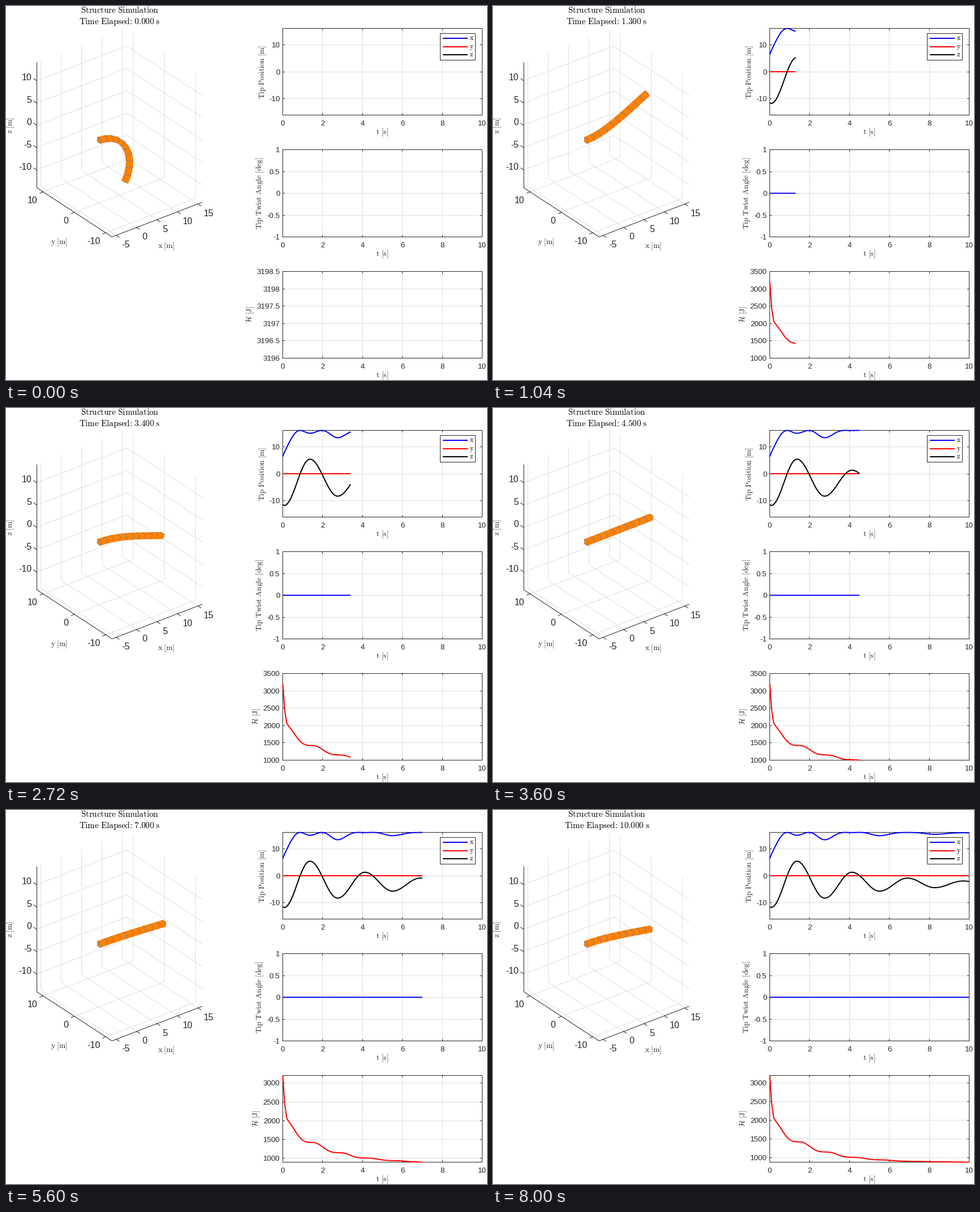
These frames come from a looping animation (849 by 660 pixels, 8.08 s). A matplotlib script:

```python
import numpy as np
import matplotlib.pyplot as plt
from matplotlib.animation import FuncAnimation
from matplotlib.collections import LineCollection, PolyCollection
from matplotlib.patches import Rectangle

plt.rcParams["font.family"] = "Liberation Sans"
plt.rcParams["mathtext.fontset"] = "cm"
plt.rcParams["path.snap"] = False

W, H, DPI = 849, 660, 96
FRAMES, STEP_MS = 101, 80
PX = 72 / DPI
INK, GRID = "#262626", "#dfdfdf"
LEFT, RIGHT = 488.5, 840.5
TIMES = np.arange(FRAMES) / 10

fig = plt.figure(figsize=(W / DPI, H / DPI), dpi=DPI, facecolor="white")
ax = fig.add_axes([0, 0, 1, 1])
ax.set_xlim(0, W)
ax.set_ylim(H, 0)
ax.axis("off")


# ---------- drawing helpers ----------
def crisp(v):
    """Centre of the pixel that holds v."""
    return np.floor(v + 1e-6) + 0.5


def segments(segs, color, z):
    col = LineCollection(segs, colors=color, linewidths=PX, zorder=z,
                         capstyle="projecting")
    ax.add_collection(col)
    return col


def curve(color, z):
    return ax.plot([], [], color=color, lw=2 * PX, zorder=z,
                   solid_capstyle="butt", solid_joinstyle="round")[0]


def number(x, y, s, size=10, ha="center"):
    """Tick label whose digits are centred on y."""
    return ax.text(x, y + 0.35 * size / PX, s, size=size, color=INK, ha=ha,
                   va="baseline", zorder=6)


def tex(s):
    parts = s.replace(" ", r"\ ").split(":")
    return "$" + r"\text{:}".join(r"\mathrm{%s}" % p for p in parts) + "$"


def label(x, y, s, size=10, rot=0, va="center", color=INK):
    return ax.text(x, y, s, size=size, rotation=rot, color=color,
                   ha="center", va=va, zorder=6)


# ---------- 3D axes ----------
SCALE, AZ, EL = 9.1, np.radians(37.5), np.radians(30)
ORIGIN = np.array([164.0, 237.2])
SCREEN = SCALE * np.array([
    [np.cos(AZ), -np.sin(AZ) * np.sin(EL)],
    [-np.sin(AZ), -np.cos(AZ) * np.sin(EL)],
    [0, -np.cos(EL)]])
TO_EYE = np.array([-np.sin(AZ) * np.cos(EL), -np.cos(AZ) * np.cos(EL), np.sin(EL)])
X0, X1, Y0, Y1, Z0, Z1 = -6, 16, -12, 12, -14, 14


def project(p):
    return ORIGIN + np.asarray(p, float) @ SCREEN


def draw_space():
    grid, ticks = [], []
    out_x, out_y = 0.95 * -SCREEN[1], 0.75 * -SCREEN[0]
    out_z = 0.95 * SCREEN[1]
    for x in range(-5, 16, 5):
        grid.append(project([(x, Y0, Z0), (x, Y1, Z0), (x, Y1, Z1)]))
        p = project((x, Y0, Z0))
        ticks.append([p, p + out_x])
        number(p[0] + 9.5, p[1] + 16, str(x), 12, "left")
    for y in (-10, 0, 10):
        grid.append(project([(X0, y, Z0), (X1, y, Z0), (X1, y, Z1)]))
        p = project((X0, y, Z0))
        ticks.append([p, p + out_y])
        number(p[0] - 10, p[1] + 14, str(y), 12, "right")
    for z in range(-10, 11, 5):
        grid.append(project([(X0, Y1, z), (X1, Y1, z), (X1, Y0, z)]))
        p = project((X0, Y1, z))
        ticks.append([p, p + out_z])
        number(p[0] - 8.5, p[1] - 6, str(z), 12, "right")
    for line in grid:
        if abs(line[1][0] - line[2][0]) < 0.01:
            line[1:, 0] = crisp(line[1:, 0])
    frame = project([(X0, Y1, Z1), (X0, Y1, Z0), (X0, Y0, Z0), (X1, Y0, Z0)])
    frame[:2, 0] = crisp(frame[:2, 0])
    segments(grid, GRID, 1)
    segments(ticks + [frame], INK, 2)
    label(282.5, 424, tex("x [m]"))
    label(94, 417, tex("y [m]"))
    label(8.5, 210.5, tex("z [m]"), rot=90)


# ---------- 2D axes ----------
class Panel:
    def __init__(self, top, bottom, lo, hi, step):
        self.top, self.bottom = top, bottom
        ts = [crisp(self.tx(t)) for t in (2, 4, 6, 8)]
        segments([[(x, top), (x, bottom)] for x in ts], GRID, 1)
        segments([[(x, a), (x, b)] for x in ts
                  for a, b in ((top, top + 3), (bottom, bottom - 3))], INK, 3)
        ax.add_patch(Rectangle((LEFT, top), RIGHT - LEFT, bottom - top,
                               fill=False, ec=INK, lw=PX, zorder=3))
        for t in range(0, 11, 2):
            number(self.tx(t), bottom + 14.3, str(t))
        label(664, bottom + 30.5, tex("t [s]"))
        self.rows = segments([], GRID, 1)
        self.marks = segments([], INK, 3)
        self.names = [number(483.5, top, "", ha="right") for _ in range(8)]
        self.scale(lo, hi, step)

    def tx(self, t):
        return LEFT + (RIGHT - LEFT) * t / 10

    def ty(self, v):
        return self.bottom - (self.bottom - self.top) * (v - self.lo) / (self.hi - self.lo)

    def scale(self, lo, hi, step):
        self.lo, self.hi = lo, hi
        first = np.ceil(lo / step - 1e-9)
        values = step * np.arange(first, np.floor(hi / step + 1e-9) + 1)
        ys = [crisp(self.ty(v)) for v in values]
        self.rows.set_segments([[(LEFT, y), (RIGHT, y)] for y in ys
                                if self.top + 1 < y < self.bottom - 1])
        self.marks.set_segments([[(a, y), (b, y)] for y in ys
                                 for a, b in ((LEFT, LEFT + 3), (RIGHT, RIGHT - 3))])
        for i, text in enumerate(self.names):
            shown = i < len(values)
            text.set_visible(shown)
            if shown:
                text.set_text("%g" % values[i])
                text.set_y(ys[i] + 0.35 * 10 / PX)

    def plot(self, line, values, n):
        if n < 2:
            line.set_data([], [])
        else:
            line.set_data(self.tx(TIMES[:n]), self.ty(values[:n]))


def draw_legend():
    ax.add_patch(Rectangle((766.5, 48.5), 62, 47, fc="white", ec=INK, lw=PX, zorder=8))
    for name, color, y in (("x", "blue", 57), ("y", "red", 72), ("z", "black", 86)):
        ax.plot([771, 815], [y, y], color=color, lw=2 * PX, zorder=9,
                solid_capstyle="butt")
        ax.text(818, y + 3, tex(name), size=9, color="black", va="baseline", zorder=9)


# ---------- motion ----------
LENGTH, PARTS, HALF = 16, 10, 0.5

# turning points of the tip height, joined by half cosines
TURN_T = np.array([0, 0.07, 1.36, 2.75, 4.12, 5.5, 6.9, 8.27, 9.68, 11.05])
TURN_Z = np.array([-11.5, -11.75, 5.4, -8.3, 1.3, -5.7, -0.85, -4.4, -1.95, -3.2])


def tip_height(t):
    i = np.searchsorted(TURN_T, t, side="right") - 1
    u = (t - TURN_T[i]) / (TURN_T[i + 1] - TURN_T[i])
    return TURN_Z[i] + (TURN_Z[i + 1] - TURN_Z[i]) * (1 - np.cos(np.pi * u)) / 2


def center_line(turn, power):
    """Points and slope angles of a clamped rod bent by a total angle."""
    u = np.linspace(0, 1, PARTS * 10 + 1)
    angle = turn * (1 - (1 - u) ** power)
    mid = (angle[1:] + angle[:-1]) / 2
    ds = LENGTH / len(mid)
    x = np.concatenate([[0], np.cumsum(np.cos(mid) * ds)])
    z = np.concatenate([[0], np.cumsum(np.sin(mid) * ds)])
    return x, z, angle


def pose(t):
    power = 1 + 2 * min(t / 0.35, 1)
    goal = tip_height(t)
    lo, hi = 0, 2.3 * np.sign(goal)
    for _ in range(30):
        mid = (lo + hi) / 2
        if abs(center_line(mid, power)[1][-1]) < abs(goal):
            lo = mid
        else:
            hi = mid
    return center_line(lo, power)


def faces_eye(q):
    (ax_, ay), (bx, by), (cx, cy), (dx, dy) = q
    return (cx - ax_) * (dy - by) - (cy - ay) * (dx - bx) < 0


def rod_shape(x, z, angle):
    """Visible faces, far ones first, and the visible edges of the cross-sections."""
    x, z, angle = x[::10], z[::10], angle[::10]
    rings = []
    for sy, sn in ((1, 1), (-1, 1), (-1, -1), (1, -1)):
        rings.append(np.stack([x - sn * HALF * np.sin(angle),
                               np.full_like(x, sy * HALF),
                               z + sn * HALF * np.cos(angle)], axis=1))
    rings = np.stack(rings, axis=1)
    faces = [rings[0][::-1], rings[-1]]
    for a, b in zip(rings[:-1], rings[1:]):
        for i in range(4):
            j = (i + 1) % 4
            faces.append(np.array([a[i], a[j], b[j], b[i]]))
    flat_faces = [project(f) for f in faces]
    edges = []
    for i, q in enumerate(flat_faces):
        if faces_eye(q):
            edges += [np.vstack([q, q[:1]])] if i < 2 else [q[:2], q[2:]]
    order = sorted(range(len(faces)), key=lambda i: faces[i].mean(axis=0) @ TO_EYE)
    return [flat_faces[i] for i in order if faces_eye(flat_faces[i])], edges


def smooth(t, knots, values):
    """Monotone cubic through the knots."""
    h = np.diff(knots)
    d = np.diff(values) / h
    m = np.concatenate([d[:1], 2 / (1 / d[:-1] + 1 / d[1:]), d[-1:]])
    i = np.clip(np.searchsorted(knots, t, side="right") - 1, 0, len(h) - 1)
    u = (t - knots[i]) / h[i]
    return (values[i] * (1 + 2 * u) * (1 - u) ** 2 + values[i + 1] * u * u * (3 - 2 * u)
            + h[i] * (m[i] * u * (1 - u) ** 2 - m[i + 1] * u * u * (1 - u)))


ENERGY_T = np.array([0, 0.1, 0.2, 0.3, 0.4, 0.6, 0.8, 1.0, 1.1, 1.2, 1.35, 1.6, 1.8,
                     2.0, 2.2, 2.4, 2.6, 2.8, 3.0, 3.2, 3.4, 3.7, 4.0, 4.4, 4.7,
                     5.0, 5.3, 5.8, 6.4, 7.0, 7.5, 8.0, 8.8, 9.4, 10])
ENERGY_V = np.array([3197.3, 2430, 2065, 1978, 1908, 1748, 1588, 1482, 1452, 1434, 1426,
                     1420, 1376, 1304, 1232, 1180, 1157, 1152, 1147, 1124, 1081, 1029,
                     1013, 1006, 985, 960, 945, 938, 914, 903, 901, 893, 890.5, 884, 880.5])
energy = smooth(TIMES, ENERGY_T, ENERGY_V)


def energy_scale(k):
    if k == 0:
        return 3196, 3198.5, 0.5
    lo, hi = energy[k], energy[0]
    for step in (200, 500):
        a, b = np.floor(lo / step) * step, np.ceil(hi / step) * step
        if (b - a) / step <= 5 and (hi - lo) / (b - a) >= 0.7:
            return a, b, step
    return np.floor(lo / 10) * 10, np.ceil(hi / 10) * 10, 500


poses = [pose(t) for t in TIMES]
tip_x = np.array([p[0][-1] for p in poses])
tip_z = np.array([p[1][-1] for p in poses])
flat = np.zeros(FRAMES)

# ---------- scene ----------
draw_space()
position = Panel(39.5, 192.5, -16, 16, 10)
twist = Panel(253.5, 407.5, -1, 1, 0.5)
power_panel = Panel(468.5, 621.5, *energy_scale(0))
draw_legend()

label(201, 11.7, tex("Structure Simulation"), 11.2, va="baseline", color="black")
clock = label(201, 31.7, "", 11.2, va="baseline", color="black")
label(453, 116, tex("Tip Position [m]"), rot=90)
label(448.5, 330, tex("Tip Twist Angle [deg]"), rot=90)
energy_name = label(431, 544.5, r"$\mathcal{H}\mathrm{\ [J]}$", rot=90)

rod = PolyCollection([], facecolors="#ff8000", edgecolors="#ff8000",
                     linewidths=0.3 * PX, zorder=5)
ax.add_collection(rod)
rod_edges = segments([], "#808080", 5.5)
rod_edges.set_linewidth(0.8 * PX)
rod_edges.set_capstyle("butt")
traces = [(position, curve("blue", 4), tip_x), (position, curve("red", 4.1), flat),
          (position, curve("black", 4.2), tip_z), (twist, curve("blue", 4), flat),
          (power_panel, curve("red", 4), energy)]


def draw(k):
    clock.set_text(tex("Time Elapsed: %.3f s" % TIMES[k]))
    faces, edges = rod_shape(*poses[k])
    rod.set_verts(faces)
    rod_edges.set_segments(edges)
    power_panel.scale(*energy_scale(k))
    energy_name.set_x(431 if k == 0 else 442)
    for panel, line, values in traces:
        panel.plot(line, values, k + 1)
    return []


anim = FuncAnimation(fig, draw, frames=FRAMES, interval=STEP_MS,
                     init_func=lambda: draw(0), repeat=True, repeat_delay=0)
plt.show()
```
